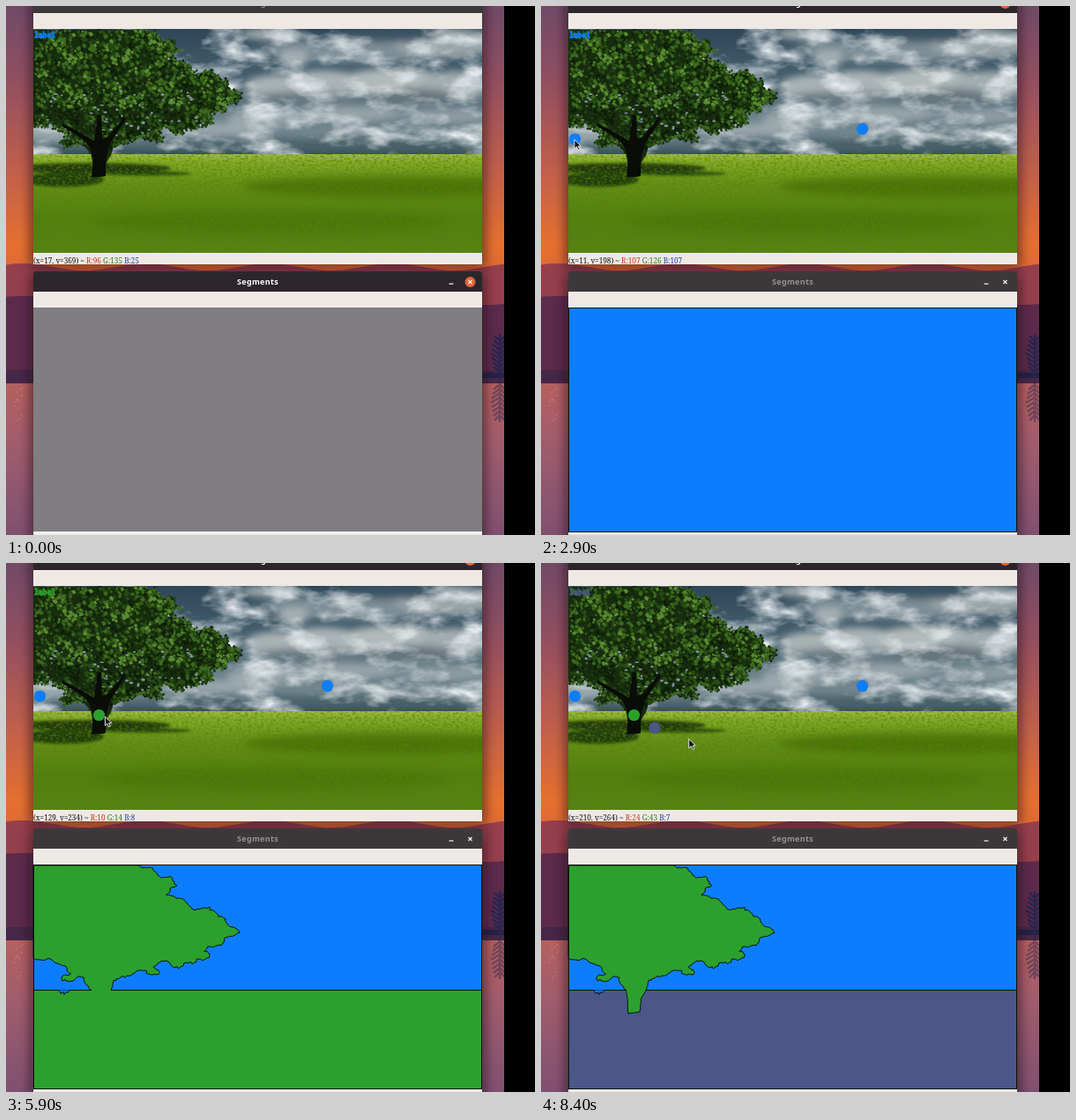
Recreate the animation shown at these times as an HTML page. Size 600 px wide and 600 px high, loop 8.5 s.

```html
<!DOCTYPE html>
<html lang="en">
<head>
<meta charset="utf-8">
<title>Segments</title>
<style>
html, body { margin: 0; width: 100%; height: 100%; overflow: hidden; background: #000; }
svg { position: absolute; left: 0; top: 0; width: 600px; height: 600px; }
#back { will-change: transform; }
.title { font: bold 9px "Noto Sans", "Open Sans", sans-serif; letter-spacing: .3px; text-anchor: middle; }
.status { font: 8.2px "Noto Serif", "Liberation Serif", serif; }
.label { font: bold 8px "Noto Sans Mono", "DejaVu Sans Mono", monospace; stroke-width: .8px; }
</style>
</head>
<body>
<svg id="back" viewBox="0 0 600 600"></svg>
<svg id="front" viewBox="0 0 600 600"></svg>
<script>
const LOOP = 8500, STEP = 100, SCALE = 0.633;
const BLUE = '#0d7dff', GREEN = '#2ca02c', SLATE = '#4b5689';
const BAR = '#efe9e6';
const $ = id => document.getElementById(id);

let seed = 11;
function rnd(a = 0, b = 1) {
  seed = (seed * 16807) % 2147483647;
  return a + (b - a) * seed / 2147483647;
}
const rect = (x, y, w, h, fill, extra = '') =>
  `<rect x="${x}" y="${y}" width="${w}" height="${h}" fill="${fill}" ${extra}/>`;
const path = (d, fill, extra = '') => `<path d="${d}" fill="${fill}" ${extra}/>`;
const oval = (x, y, rx, ry, fill, extra = '') =>
  `<ellipse cx="${x}" cy="${y}" rx="${rx}" ry="${ry}" fill="${fill}" ${extra}/>`;
const gradient = (id, y1, y2, stops) =>
  `<linearGradient id="${id}" gradientUnits="userSpaceOnUse" x1="0" x2="0" y1="${y1}" y2="${y2}">` +
  stops.map(([o, c]) => `<stop offset="${o}" stop-color="${c}"/>`).join('') + '</linearGradient>';
const blur = (id, s) =>
  `<filter id="${id}" x="-50%" y="-50%" width="200%" height="200%"><feGaussianBlur stdDeviation="${s}"/></filter>`;

// Outline of the tree in the lower window
const crown = `148,343 155,346 165,345 171,352 176,357 186,356 190,362 193,365 186,370 183,376
 192,379 203,383 208,388 214,393 230,391 240,399 248,404 254,412 263,416 265,419 258,423 249,425
 246,432 238,435 229,435 226,440 231,445 226,450 217,449 214,454 204,453 196,460 188,457 184,451
 172,453 167,458 174,462 171,468 160,466 158,461 148,463 140,469 128,470 122,474 119,485
 114,493 112,509 99,511 98,493 96,484 91,478 88,470 80,470 73,475 64,473 62,470 68,467 74,466
 66,458 56,453 48,449 40,451 31,448`.trim().split(/\s+/).map(p => p.split(',').map(Number));

function ragged(points) {
  const out = [];
  points.slice(1).forEach(([x2, y2], i) => {
    const [x1, y1] = points[i];
    const n = Math.max(1, Math.round(Math.hypot(x2 - x1, y2 - y1) / 2.6));
    const amp = y1 >= 485 ? 0.4 : 1.2;
    for (let k = 0; k < n; k++) {
      out.push([x1 + (x2 - x1) * k / n + rnd(-amp, amp), y1 + (y2 - y1) * k / n + rnd(-amp, amp)]);
    }
  });
  out.push(points[points.length - 1], [31, 343]);
  return out;
}
const edge = ragged(crown);
const toPath = pts => 'M' + pts.map(p => p.map(v => v.toFixed(1)).join(' ')).join('L') + 'Z';
const treePath = toPath(edge);

function inside(x, y) {
  let hit = false;
  edge.forEach(([x1, y1], i) => {
    const [x2, y2] = edge[(i + 1) % edge.length];
    if ((y1 > y) !== (y2 > y) && x < (x2 - x1) * (y - y1) / (y2 - y1) + x1) hit = !hit;
  });
  return hit;
}

function wallpaper() {
  const ridge = (y, amp, f, p) => {
    let d = 'M0 600';
    for (let x = 0; x <= 565; x += 5) d += `L${x} ${(y - amp * Math.sin(x * f + p)).toFixed(1)}`;
    return d + 'L565 600Z';
  };
  let frond = '';
  for (let y = 376; y < 416; y += 5) frond += `M560 ${y + 4}L${550 + Math.abs(y - 396) / 5} ${y - 2}M560 ${y + 4}L567 ${y - 3}`;
  const palm = `<path d="M560 372V422${frond}" stroke="#28264d" stroke-width="2.4" fill="none"/>`;
  let glints = '';
  for (let i = 0; i < 12; i++) glints += rect(rnd(8, 18).toFixed(1), rnd(432, 474).toFixed(1), 1.5, 1, '#e7a79d', 'opacity=".6"');
  return rect(0, 0, 565, 600, 'url(#dusk)') +
    path(ridge(296, 4, .045, .7), '#963f4c') + path(ridge(334, 5, .03, 1), '#5c2b4c') +
    rect(0, 413, 565, 15, '#462748') + rect(540, 416, 25, 6, '#262247') +
    rect(0, 428, 565, 172, 'url(#lake)') + palm +
    `<g transform="matrix(1 0 0 -1 0 844)" opacity=".45">${palm}</g>` + glints +
    rect(27, -10, 517, 306, '#1a0a18', 'opacity=".55" filter="url(#b6)"') +
    rect(27, 303, 517, 310, '#1a0a18', 'opacity=".55" filter="url(#b6)"');
}

function sky() {
  // x, y, rx, ry, colour
  const clouds = [
    [400, 50, 110, 14, '#7d8e96'], [500, 42, 60, 17, '#9aa5a9'], [300, 32, 34, 7, '#a0abae'],
    [326, 60, 17, 10, '#a4afb3'], [285, 55, 15, 6, '#6d818b'], [440, 33, 60, 8, '#3b5364'],
    [310, 92, 40, 14, '#a9b2b4'], [360, 88, 48, 15, '#aab3b5'], [440, 85, 60, 14, '#b1b9ba'],
    [510, 90, 40, 16, '#a3adb0'], [340, 105, 60, 8, '#677a82'], [455, 103, 55, 10, '#66777e'],
    [390, 122, 60, 8, '#98a5a9'], [290, 128, 40, 9, '#9aa7ac'], [500, 125, 50, 8, '#8d9ca1'],
    [240, 140, 70, 7, '#9ba9ad'], [390, 142, 90, 5, '#77898f'], [60, 143, 45, 10, '#98a8ac'],
    [480, 149, 80, 5, '#526a72'], [280, 155, 130, 4, '#4b646d'], [440, 158, 120, 4, '#425b62']
  ];
  return rect(31, 26, 509, 143, 'url(#sky)') +
    '<g filter="url(#b4)">' + clouds.map(([x, y, a, b, c]) => oval(x, y, a, b, c)).join('') + '</g>' +
    rect(31, 26, 509, 143, '#fff', 'filter="url(#puffs)"');
}

function meadow() {
  return rect(31, 168, 509, 112, 'url(#grass)') +
    '<g filter="url(#b4)">' + oval(440, 205, 170, 12, '#355f0b', 'opacity=".55"') +
    oval(300, 245, 200, 14, '#3a640c', 'opacity=".3"') + '</g>' +
    '<g filter="url(#b1)" opacity=".88">' + oval(95, 184, 92, 6, '#132b07') +
    oval(65, 197, 46, 8, '#163209') + oval(160, 190, 50, 2.5, '#193708') + '</g>' +
    rect(31, 168, 509, 112, '#000', 'filter="url(#blades)"');
}

function tree() {
  const tones = ['#0d1c09', '#17300d', '#274a14', '#3c691e', '#5b8a31'];
  const leaves = tones.map(() => '');
  const leaf = (x, y, tone, r) => {
    leaves[tone] += `M${x.toFixed(1)} ${y.toFixed(1)}l${r} ${(-r * rnd(.2, .9)).toFixed(1)} ${(r * .7).toFixed(1)} ${r} ${-r} ${(r * .6).toFixed(1)}z`;
  };
  for (let i = 0; i < 3600; i++) {
    const x = rnd(29, 264), y = rnd(24, 160);
    if (!inside(x, y + 316)) continue;
    const light = rnd(0, 3.6) + 1.1 * Math.sin(x * .11 + y * .05) * Math.sin(y * .19) + (y < 115 ? .5 : -.5);
    leaf(x, y, Math.max(0, Math.min(4, Math.floor(light))), +rnd(1.5, 3.6).toFixed(1));
  }
  edge.forEach(([x, y]) => {
    if (y < 474) for (let k = 0; k < 3; k++) leaf(x + rnd(-4, 3), y - 316 + rnd(-3, 3), Math.floor(rnd(0, 4)), 2.2);
  });
  let gaps = '';
  for (let i = 0; i < 80; i++) {
    const x = rnd(35, 225), y = rnd(95, 148);
    if (inside(x, y + 316)) gaps += oval(x.toFixed(1), y.toFixed(1), rnd(.7, 2.4).toFixed(1), rnd(.6, 1.5).toFixed(1), '#81949a');
  }
  const trunk = 'M97 194L99 174Q97 158 84 149L63 136 64 133 88 146 100 153 104 124 108 124 109 152 117 147 134 126 136 128 121 151Q112 166 113 193Z';
  return path(treePath, '#162b0d', 'transform="translate(0 -316)"') +
    leaves.map((d, i) => path(d, tones[i])).join('') + gaps + path(trunk, '#090c07');
}

function segments() {
  const line = 'stroke="#07140c" stroke-width="1"';
  const ground = c => rect(31.5, 484.5, 508, 112, c, line);
  const frame = rect(31.5, 342.5, 508, 254, 'none', line);
  const nick = path('M60 484.5l2 4 3-2 1 3 2-3 2 1 2-3', BLUE, line);
  const base = rect(31, 342, 509, 255, BLUE);
  const leafy = path(treePath, GREEN, line);
  return rect(31, 342, 509, 254, '#807e80') +
    `<g id="s1">${base}${frame}</g>` +
    `<g id="s2">${base}${leafy}${ground(GREEN)}${rect(97, 483, 22, 3, GREEN)}${nick}${frame}</g>` +
    `<g id="s3">${base}${ground(SLATE)}${leafy}${nick}${frame}</g>`;
}

const closeMark = (y, id) =>
  `<circle id="${id}" cx="526.5" cy="${y}" r="6" fill="#e0653a"/>` +
  `<path d="M524.5 ${y - 2}l4 4m0-4l-4 4" stroke="#f4efed" stroke-width="1.3"/>`;

$('back').innerHTML = '<defs>' +
  gradient('dusk', 0, 300, [[0, '#704a66'], [.3, '#944f60'], [.62, '#c05f4b'], [.9, '#e4702f'], [1, '#dd6a35']]) +
  gradient('lake', 428, 600, [[0, '#b5605f'], [.4, '#a05c6d'], [1, '#805070']]) +
  gradient('sky', 26, 169, [[0, '#2d4658'], [.35, '#435d6c'], [.7, '#6b808a'], [.88, '#647b83'], [1, '#344d53']]) +
  gradient('grass', 168, 280, [[0, '#a0bd49'], [.08, '#82ab29'], [.3, '#639019'], [.65, '#517f12'], [1, '#568319']]) +
  blur('b1', 1.5) + blur('b4', 4) + blur('b6', 6) +
  `<filter id="puffs" x="0" y="0" width="1" height="1"><feTurbulence type="fractalNoise" baseFrequency=".022 .045" numOctaves="4" seed="5"/>
   <feColorMatrix values="0 0 0 0 .8  0 0 0 0 .84  0 0 0 0 .86  2.6 0 0 0 -1.15"/></filter>
   <filter id="blades" x="0" y="0" width="1" height="1"><feTurbulence type="fractalNoise" baseFrequency=".28 .4" numOctaves="2" seed="3"/>
   <feColorMatrix values="0 0 0 0 .1  0 0 0 0 .22  0 0 0 0 0  1.8 0 0 0 -.75"/></filter>` +
  '<clipPath id="photo"><rect x="31" y="26" width="509" height="254"/></clipPath></defs>' +
  rect(0, 0, 600, 600, '#000') +
  `<svg width="565" height="600" style="width:565px">${wallpaper()}</svg>` +
  rect(31, 0, 509, 293, BAR) + `<g clip-path="url(#photo)">${sky()}${meadow()}${tree()}</g>` +
  rect(31, 324, 509, 276, BAR) + rect(31, 597, 509, 1.5, '#f8f6f5');

$('front').innerHTML =
  '<defs><clipPath id="foot"><rect x="31" y="281" width="509" height="11.5"/></clipPath></defs>' +
  rect(31, 0, 509, 8, '#3c383a', 'id="bar1"') +
  '<text id="name1" class="title" x="285.5" y="0">Image</text><circle id="x1" cx="526.5" cy="-3" r="6" fill="#e0653a"/>' +
  path('M31 324V305q0-4 4-4H536q4 0 4 4V324Z', '#2c262a', 'id="bar2"') +
  '<text id="name2" class="title" x="285.5" y="316">Segments</text>' +
  rect(502.5, 314.5, 5, 1.3, '#eee8e6') + closeMark(313, 'x2') + segments() +
  '<text id="label" class="label" x="32" y="36">label</text><g id="dots"></g>' +
  '<text class="status" x="31" y="292" clip-path="url(#foot)"><tspan id="pos" fill="#161616"></tspan>' +
  '<tspan id="r" fill="#c23a1c"></tspan><tspan id="g" fill="#2c7a1e"></tspan><tspan id="b" fill="#173f9c"></tspan></text>' +
  path('M0 0V10.5L2.5 8.2 4.3 12 6 11.2 4.3 7.6H7.5Z', '#111', 'id="cursor" stroke="#f4f4f4" stroke-width=".9"');

// step, pointer x and y in photo pixels, colour under it
const moves = [
  [0, 17, 369, 96, 135, 25], [2, 17, 369, 96, 135, 25], [7, 525, 178, 119, 142, 130],
  [9, 525, 178, 119, 142, 130], [11, 133, 243, 8, 12, 7], [14, 16, 208, 99, 118, 104],
  [20, 8, 202, 107, 126, 107], [30, 11, 198, 107, 126, 107], [38, 265, 213, 51, 71, 65],
  [47, 117, 230, 5, 7, 7], [55, 117, 230, 5, 7, 7], [68, 168, 247, 25, 40, 12],
  [72, 155, 254, 20, 36, 9], [79, 155, 254, 20, 36, 9], [83, 210, 264, 24, 43, 7], [84, 216, 274, 24, 43, 7]
];
// step, x, y, colour
const marks = [[9, 364.5, 139.5, BLUE], [23, 38.5, 151, BLUE], [53, 105.5, 172.5, GREEN], [74, 129, 187, SLATE]];

function pointer(n) {
  const i = Math.max(1, moves.findIndex(m => m[0] >= n));
  const a = moves[i - 1], b = moves[i];
  const u = (n - a[0]) / (b[0] - a[0]), k = u * u * (3 - 2 * u);
  return a.slice(1).map((v, j) => v + (b[j + 1] - v) * k);
}
const mix = (a, b, k) => `rgb(${a.map((v, i) => Math.round(v + (b[i] - v) * k))})`;
const show = (id, on) => $(id).setAttribute('display', on ? 'inline' : 'none');

function draw(n) {
  const [px, py] = pointer(n);
  $('cursor').setAttribute('transform', `translate(${31 + px * SCALE} ${26 + py * SCALE})`);
  show('cursor', n > 2);

  // The readout stalls while the regions are computed
  const seen = n > 9 && n < 14 ? 9 : Math.min(n, 83);
  const [x, y, r, g, b] = pointer(seen).map(Math.round);
  $('pos').textContent = `(x=${x}, y=${y}) ~ `;
  $('r').textContent = `R:${r} `;
  $('g').textContent = `G:${g} `;
  $('b').textContent = `B:${b}`;

  const focus = Math.max(0, Math.min(1, (n - 8) / 2));
  const on = [44, 38, 42], off = [60, 56, 58], lit = [255, 255, 255], dim = [150, 145, 147];
  $('bar1').setAttribute('fill', mix(off, on, focus));
  $('bar2').setAttribute('fill', mix(on, off, focus));
  $('name1').setAttribute('fill', mix(dim, lit, focus));
  $('name2').setAttribute('fill', mix(lit, dim, focus));
  $('x1').setAttribute('opacity', focus);
  $('x2').setAttribute('opacity', 1 - focus);

  const ink = n < 30 ? BLUE : n < 62 ? GREEN : SLATE;
  $('label').setAttribute('fill', ink);
  $('label').setAttribute('stroke', ink);
  $('dots').innerHTML = marks.filter(m => n >= m[0]).map(([, mx, my, c]) => oval(mx, my, 6.6, 6.6, c)).join('');
  show('s1', n >= 14 && n < 54);
  show('s2', n >= 54 && n < 78);
  show('s3', n >= 78);
}

const start = performance.now();
let last = -1;
function tick() {
  const n = Math.floor((performance.now() - start) % LOOP / STEP);
  if (n !== last) draw(last = n);
  requestAnimationFrame(tick);
}
tick();
</script>
</body>
</html>
```
